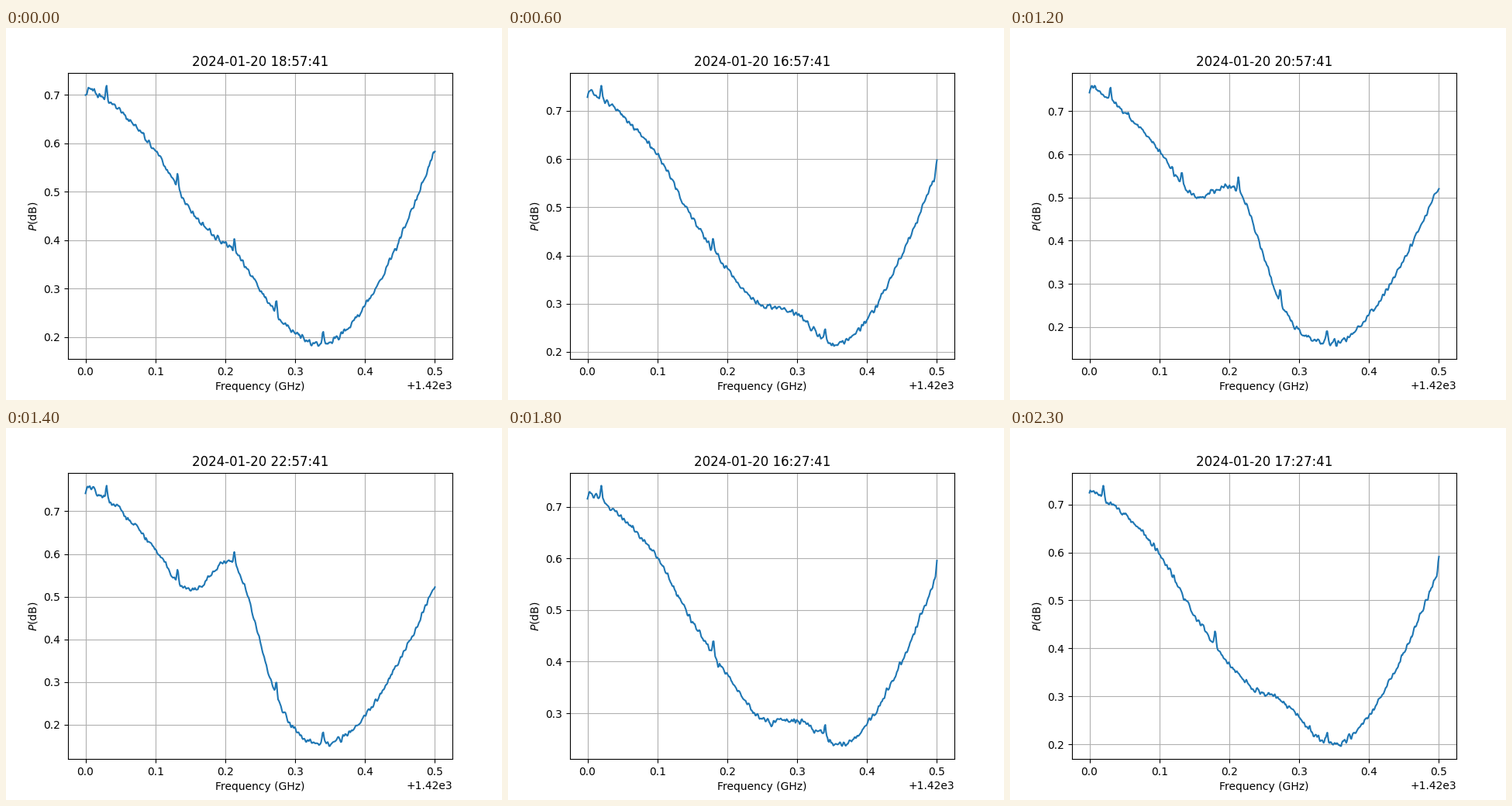
Animation of 640x480 px, one loop 2.4 s. Source, as a matplotlib script:

```python
import numpy as np
import matplotlib.pyplot as plt
from matplotlib.animation import FuncAnimation

X = np.linspace(0, 0.5, 480)

# Half-hour slots counted from 11:57:41, in playing order.
ORDER = [14, 14, 7, 20, 2, 16, 10, 5, 21, 12, 13, 3,
         18, 8, 22, 6, 4, 15, 9, 19, 0, 1, 17, 11]

# Receiver passband at even steps, without any signal.
PASSBAND = np.array([0.735, 0.680, 0.595, 0.465, 0.355, 0.250,
                     0.195, 0.180, 0.250, 0.385, 0.560])

# Interference lines by first and last slot.
LINES = {(9, 11): [0.02, 0.18, 0.5],
         (12, 22): [0.03, 0.132, 0.213, 0.273],
         (9, 22): [0.34]}

# Lowest and highest power over the day.
RANGE_SLOTS = [0, 4, 9, 10, 11, 13, 14, 18, 22]
LOW = [0.380, 0.2077, 0.2364, 0.2122, 0.1962, 0.1873, 0.1811, 0.1557, 0.150]
HIGH = [0.780, 0.7740, 0.7408, 0.7524, 0.7392, 0.7275, 0.7193, 0.7594, 0.760]


def bell(center, width):
    return np.exp(-0.5 * ((X - center) / width) ** 2)


def passband():
    """Cubic Hermite curve through the passband points."""
    pos = X / 0.05
    i = np.minimum(pos.astype(int), len(PASSBAND) - 2)
    u = pos - i
    slope = np.gradient(PASSBAND)
    return ((1 + 2 * u) * (1 - u) ** 2 * PASSBAND[i]
            + u * (1 - u) ** 2 * slope[i]
            + u ** 2 * (3 - 2 * u) * PASSBAND[i + 1]
            + u ** 2 * (u - 1) * slope[i + 1])


def ripple(seed, size):
    raw = np.random.default_rng(seed).normal(0, size, len(X) + 2)
    return np.convolve(raw, [0.25, 0.5, 0.25], "valid")


def spectrum(slot):
    # A broad hump drifts down in frequency while the passband tilts.
    center = np.interp(slot, [4, 9, 14, 18], [0.385, 0.310, 0.228, 0.215])
    height = np.interp(slot, [0, 4, 9, 14, 18, 22],
                       [0.20, 0.12, 0.07, 0.055, 0.19, 0.25])
    tilt = np.interp(slot, [4, 9, 11, 14, 18], [0.03, 0, 0, -0.025, 0.035])

    y = passband() + tilt * (1 - X / 0.3) + height * bell(center, 0.035)
    y += ripple(slot, 0.005) - 0.014 * np.exp(-X / 0.0015)
    for (first, last), freqs in LINES.items():
        if first <= slot <= last:
            y += sum(0.03 * bell(f, 0.0012) for f in freqs)

    low, high = (np.interp(slot, RANGE_SLOTS, v) for v in (LOW, HIGH))
    return low + (y - y.min()) / np.ptp(y) * (high - low)


def clock(slot):
    minutes = 11 * 60 + 57 + 30 * slot
    return f"2024-01-20 {minutes // 60:02d}:{minutes % 60:02d}:41"


fig, ax = plt.subplots(figsize=(6.4, 4.8), dpi=100)
line, = ax.plot(1420 + X, spectrum(ORDER[0]))
ax.set_xlabel("Frequency (GHz)")
ax.set_ylabel("$P$(dB)")
ax.grid(True)


def update(frame):
    slot = ORDER[frame]
    line.set_ydata(spectrum(slot))
    ax.relim()
    ax.autoscale_view(scalex=False)
    ax.set_title(clock(slot))
    return line,


anim = FuncAnimation(fig, update, frames=len(ORDER), interval=100,
                     repeat=True, repeat_delay=0, blit=False)
plt.show()
```
